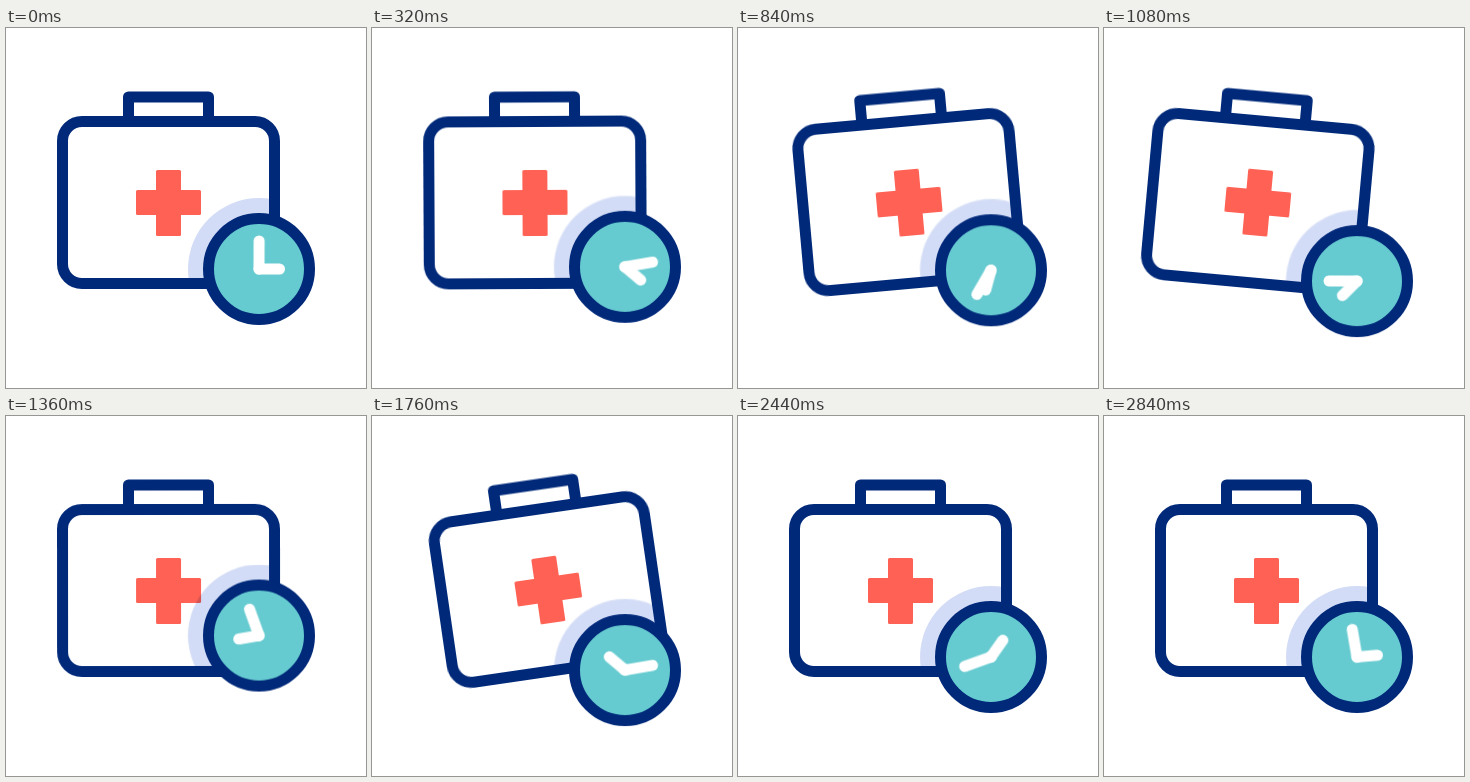
An HTML page for the animation above (2880 ms loop, 360 by 360 pixels).

```html
<!DOCTYPE html>
<html lang="en">
<head>
<meta charset="utf-8">
<title>First aid around the clock</title>
<style>
  :root {
    --loop: 2880ms;
    --sine: cubic-bezier(.37, 0, .63, 1);
    --navy: #00297a;
  }
  html, body { margin: 0; width: 100%; height: 100%; overflow: hidden; background: #fff; }
  svg { display: block; width: 100%; height: 100%; }

  .line { fill: none; stroke: var(--navy); stroke-width: 11; stroke-linejoin: round; }
  .cross { fill: #ff6154; }
  .halo { fill: #d3dcf6; }
  .face { fill: #66cbd0; stroke: var(--navy); stroke-width: 11; }
  .hand { stroke: #fff; stroke-width: 11; stroke-linecap: round; }

  .swing, .steady {
    --dir: 1;
    transform-origin: 162.5px 79px;
    animation: swing var(--loop) var(--sine) infinite;
  }
  /* Cancels the swing so the halo stays upright inside the case clip. */
  .steady { --dir: -1; mix-blend-mode: multiply; }
  .bob { animation: bob var(--loop) var(--sine) infinite; }
  .hand {
    transform-origin: 253px 241px;
    animation: turn var(--loop) linear infinite;
  }
  .minute { animation-duration: calc(var(--loop) / 2); }

  @keyframes swing {
    0%, 9.7%, 71.6%, 100% { transform: rotate(0deg); }
    22.8%, 57.2% { transform: rotate(calc(var(--dir) * -10deg)); }
    40% { transform: rotate(calc(var(--dir) * 6deg)); }
  }
  @keyframes bob {
    0%, 8.7%, 75.6%, 100% { transform: translateY(0); }
    20.9%, 49.1% { transform: translateY(-23px); }
    35%, 63.2% { transform: translateY(15px); }
  }
  @keyframes turn { to { transform: rotate(360deg); } }
</style>
</head>
<body>
<svg viewBox="0 0 360 360">
  <defs>
    <rect id="case" x="56.5" y="93.5" width="212" height="162" rx="19.5"/>
    <clipPath id="inside"><use href="#case"/></clipPath>
  </defs>

  <g class="swing">
    <g clip-path="url(#inside)">
      <use href="#case" fill="#fff"/>
      <g class="cross">
        <rect x="150" y="142" width="25" height="66" rx="1.5"/>
        <rect x="130" y="162" width="65" height="25" rx="1.5"/>
      </g>
      <g class="steady">
        <circle class="halo bob" cx="253" cy="241" r="71"/>
      </g>
    </g>
    <path class="line" d="M122.5 94V69H202.5V94"/>
    <use class="line" href="#case"/>
  </g>

  <g class="bob">
    <circle class="face" cx="253" cy="241" r="50.5"/>
    <line class="hand minute" x1="253" y1="241" x2="253" y2="213"/>
    <line class="hand" x1="253" y1="241" x2="273.5" y2="241"/>
  </g>
</svg>
</body>
</html>
```
